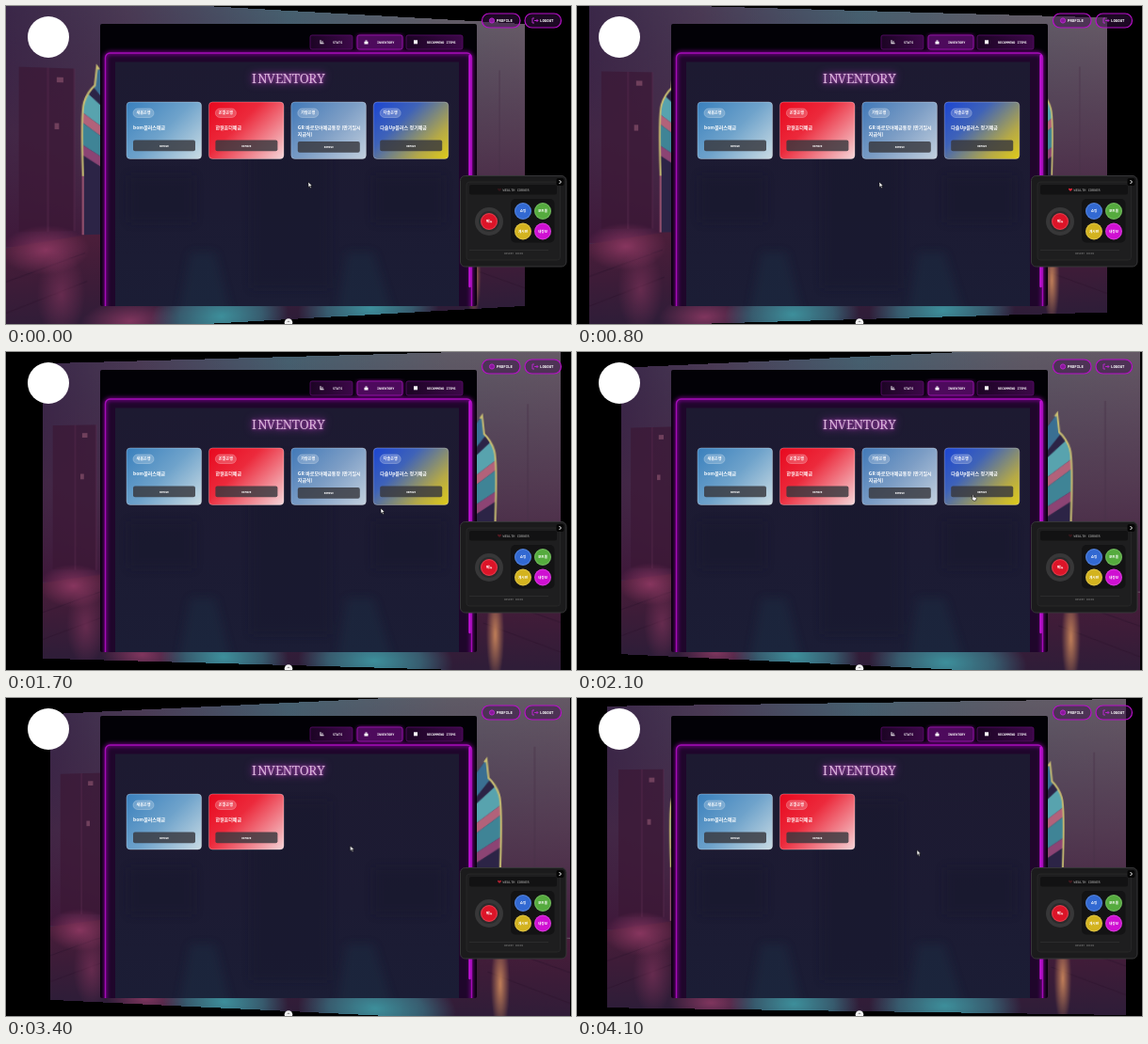
Write an HTML page that moves like this. It is 600x338 px and loops after 4.2 s.

```html
<!DOCTYPE html>
<html lang="ko">
<head>
<meta charset="utf-8">
<title>Inventory</title>
<style>
  html, body { margin: 0; width: 100%; height: 100%; overflow: hidden; background: #000; }
  .stage { position: relative; width: 600px; height: 338px; overflow: hidden; background: #000; perspective: 312px; perspective-origin: 301px 169px; }
  .room { position: absolute; left: 26px; top: 5px; width: 550px; height: 328px; animation: sway 4.2s infinite; }
  .ui { position: absolute; left: 0; top: 0; }
  text { font-family: "DejaVu Sans Mono", monospace; font-weight: bold; fill: #fff; }
  .ko { font-family: "Noto Sans CJK KR", "Noto Sans CJK", sans-serif; font-weight: 700; }
  .mid { text-anchor: middle; }
  .title { font: 13.5px "Noto Serif", serif; fill: #d9b4da; filter: drop-shadow(0 0 1.5px #b048b8) drop-shadow(0 0 4px #8a2c98); }

  .face { animation: shrink 4.2s step-end infinite; }
  .card3 { animation: drop3 4.2s step-end infinite; }
  .card4 { animation: drop4 4.2s step-end infinite; }
  .deep { animation: deepen 4.2s step-end infinite; }
  .heart { animation: pulse 4.2s ease-in-out infinite; }
  .cursor { animation: move 4.2s linear infinite; }
  .arrow { animation: arrow 4.2s step-end infinite; }
  .hand { animation: hand 4.2s step-end infinite; }

  @keyframes sway {
    0% { transform: rotateY(6.13deg); animation-timing-function: cubic-bezier(.393, .12, .574, 1); }
    65.7% { transform: rotateY(-6.3deg); animation-timing-function: cubic-bezier(.418, 0, .711, .494); }
    100% { transform: rotateY(-.9deg); }
  }
  @keyframes shrink { 0% { height: 60.5px; } 73.8%, 100% { height: 59px; } }
  @keyframes drop3 { 0% { visibility: visible; } 73.8%, 100% { visibility: hidden; } }
  @keyframes drop4 { 0% { visibility: visible; } 54.8%, 100% { visibility: hidden; } }
  @keyframes deepen { 0% { opacity: 0; } 54.8%, 100% { opacity: 1; } }
  @keyframes pulse { 0%, 47.6%, 95.2% { opacity: .15; } 23.8%, 71.4% { opacity: 1; } 100% { opacity: .3; } }
  @keyframes move {
    0%, 26.2% { transform: translate(321px, 187px); }
    31% { transform: translate(333px, 190px); }
    40.5% { transform: translate(398px, 166px); }
    47.6%, 56% { transform: translate(420px, 151px); }
    64.3% { transform: translate(383px, 150.5px); }
    67.9%, 73% { transform: translate(366px, 151px); }
    81% { transform: translate(365.5px, 157px); }
    97.6%, 100% { transform: translate(361px, 161.5px); }
  }
  @keyframes arrow { 0%, 54.8%, 73.8%, 100% { opacity: 1; } 44%, 66.7% { opacity: 0; } }
  @keyframes hand { 0%, 54.8%, 73.8%, 100% { opacity: 0; } 44%, 66.7% { opacity: 1; } }
</style>
</head>
<body>
<div class="stage">
  <svg class="room" viewBox="26 5 550 328" width="550" height="328">
    <defs>
      <linearGradient id="wall"><stop stop-color="#3a2748"/><stop offset=".2" stop-color="#4a3a54"/><stop offset=".5" stop-color="#46606f"/><stop offset=".8" stop-color="#5f5b66"/><stop offset="1" stop-color="#665a66"/></linearGradient>
      <linearGradient id="dusk" x2="0" y2="1"><stop stop-color="#3a1f42" stop-opacity="0"/><stop offset=".55" stop-color="#472644" stop-opacity=".6"/><stop offset="1" stop-color="#3f1638" stop-opacity=".9"/></linearGradient>
      <linearGradient id="floor" x2="0" y2="1"><stop stop-color="#4c1e3a"/><stop offset=".5" stop-color="#3d1c38"/><stop offset="1" stop-color="#2e1d38"/></linearGradient>
      <radialGradient id="teal"><stop stop-color="#3d8f9b"/><stop offset=".6" stop-color="#3d8f9b" stop-opacity=".55"/><stop offset="1" stop-color="#3d8f9b" stop-opacity="0"/></radialGradient>
      <radialGradient id="pink"><stop stop-color="#a2406e" stop-opacity=".7"/><stop offset="1" stop-color="#a2406e" stop-opacity="0"/></radialGradient>
      <radialGradient id="gold"><stop stop-color="#d08a5c" stop-opacity=".9"/><stop offset="1" stop-color="#d08a5c" stop-opacity="0"/></radialGradient>
      <clipPath id="side"><path id="edge" d="M470 112 L499 71 L501 90 Q508 97 511 107 T512 180 V238 H470Z"/></clipPath>
      <g id="cabinet">
        <g clip-path="url(#side)">
          <path d="M470 60h50v180h-50z" fill="#2c2446"/>
          <path d="M470 112L502 66V92L470 134z" fill="#3a6f92"/>
          <path d="M470 134L514 92V116L470 150z" fill="#58a3ae"/>
          <path d="M470 150L514 116V126L470 160z" fill="#b2627a"/>
          <path d="M470 160L514 126V148L470 178z" fill="#3f8496"/>
          <path d="M470 178L514 148V158L470 188z" fill="#8c4474"/>
        </g>
        <path d="M497 74L499 71L501 90Q508 97 511 107T512 180" fill="none" stroke="#c8bd72" stroke-width="1.8"/>
        <path d="M512 180V238" stroke="#b2607c" stroke-width="1.4"/>
      </g>
    </defs>
    <path d="M26 5h550v328H26z" fill="url(#wall)"/>
    <path d="M26 5h550v243H26z" fill="url(#dusk)"/>
    <path d="M38 74h50v160H38z" fill="#3b1736" opacity=".7"/>
    <path d="M64 74v160M88 74v160" stroke="#5a2c50" stroke-width=".8"/>
    <path d="M72 83h6v5h-6zM70 128h4v6h-4z" fill="#70405c"/>
    <path d="M544 60v180" stroke="#4b3349" stroke-width=".8"/>
    <path d="M26 249L100 238H500L576 249V333H26z" fill="url(#floor)"/>
    <path d="M26 282L98 256M26 312L100 284M576 282L502 256M576 312L500 284" stroke="#2e152e" stroke-width=".7"/>
    <ellipse cx="62" cy="252" rx="40" ry="24" fill="url(#pink)"/>
    <ellipse cx="76" cy="296" rx="22" ry="44" fill="url(#pink)" opacity=".6"/>
    <ellipse cx="140" cy="326" rx="46" ry="22" fill="url(#pink)"/>
    <ellipse cx="230" cy="326" rx="70" ry="40" fill="url(#teal)"/>
    <ellipse cx="390" cy="326" rx="80" ry="40" fill="url(#teal)"/>
    <ellipse cx="512" cy="296" rx="9" ry="48" fill="url(#gold)"/>
    <use href="#cabinet"/>
    <use href="#cabinet" transform="matrix(-1 0 0 1 608 0)"/>
  </svg>

  <svg class="ui" width="600" height="338" viewBox="0 0 600 338">
    <defs>
      <g id="slant"></g>
      <linearGradient id="axis" gradientUnits="userSpaceOnUse" x1="5" y1="-5" x2="75" y2="65"/>
      <linearGradient id="c1" href="#axis"><stop stop-color="#3980bd"/><stop offset=".5" stop-color="#6fa3cb"/><stop offset="1" stop-color="#cbdce4"/></linearGradient>
      <linearGradient id="c2" href="#axis"><stop stop-color="#e8081e"/><stop offset=".4" stop-color="#ec2a3c"/><stop offset="1" stop-color="#f5d6d9"/></linearGradient>
      <linearGradient id="c3" href="#axis"><stop stop-color="#4179b8"/><stop offset=".5" stop-color="#7c9dc5"/><stop offset="1" stop-color="#c3d0de"/></linearGradient>
      <linearGradient id="c4" href="#axis"><stop stop-color="#1c46d2"/><stop offset=".35" stop-color="#3f63b8"/><stop offset=".75" stop-color="#b5a947"/><stop offset="1" stop-color="#e0cc18"/></linearGradient>
      <linearGradient id="deep" x2=".5" y2=".5"><stop stop-color="#1238c8"/><stop offset="1" stop-color="#1238c8" stop-opacity="0"/></linearGradient>
      <linearGradient id="tab"><stop stop-color="#1c0424"/><stop offset="1" stop-color="#3c0848"/></linearGradient>
      <linearGradient id="body" x2="0" y2="1"><stop stop-color="#1d1a31"/><stop offset=".6" stop-color="#1c1b33"/><stop offset="1" stop-color="#1b1d35"/></linearGradient>
      <clipPath id="box"><path d="M100 19h400v300H100z"/></clipPath>
      <filter id="blur" x="-20%" y="-20%" width="140%" height="140%"><feGaussianBlur stdDeviation="2"/></filter>
      <filter id="soft" x="-20%" y="-20%" width="140%" height="140%"><feGaussianBlur stdDeviation="5"/></filter>
    </defs>

    <g clip-path="url(#box)">
      <rect x="100" y="19" width="400" height="300" rx="2" fill="#020106"/>
      <rect x="105.500" y="50" width="389" height="300" rx="5" fill="#1f062b"/>
      <rect x="105.500" y="50" width="389" height="300" rx="5" fill="none" stroke="#86089a" stroke-width="3" filter="url(#blur)"/>
      <rect x="105.500" y="50" width="389" height="300" rx="5" fill="none" stroke="#a50cb8" stroke-width="1.400"/>
      <path d="M116 59.500h365V319H116z" fill="url(#body)"/>
      <g filter="url(#soft)" opacity=".35">
        <path d="M260 110h84v190h-84zM130 180h70v50h-70zM390 180h75v50h-75z" fill="#14132a"/>
        <path d="M196 262h26l16 64h-54zM362 262h28l20 64h-58z" fill="#1d3549"/>
      </g>
      <path d="M492.500 53V298" stroke="#c412da" stroke-width="2.400" stroke-linecap="round"/>
    </g>
    <text class="title mid" x="263.5 272.4 281.300 290.200 299 307.800 316.700 325.600 334.500" y="82">INVENTORY</text>

    <g id="tabs"></g>
    <g id="cards"></g>

    <circle cx="45" cy="33" r="22" fill="#fff"/>

    <g fill="#3a1048" fill-opacity=".5" stroke="#b80fc9" stroke-width="1.200">
      <rect x="505.500" y="8" width="40.500" height="15" rx="7.500"/>
      <rect x="551" y="8" width="38.500" height="15" rx="7.500"/>
    </g>
    <g fill="none" stroke="#b428c8">
      <circle cx="516" cy="15.500" r="2.600" fill="#8a189c"/>
      <path d="M561 13h-2v5h2M561 15.500h4M563.500 14l1.500 1.500l-1.500 1.500"/>
    </g>
    <text x="521" y="17" font-size="4">PROFILE</text>
    <text x="567" y="17" font-size="4">LOGOUT</text>

    <rect x="482.500" y="180.500" width="112.500" height="96.500" rx="5" fill="#1b1b1c" stroke="#363638"/>
    <rect x="489" y="187" width="99.500" height="83" rx="3" fill="#1e1e1f" stroke="#2c2c2d" stroke-width=".7"/>
    <rect x="492" y="190" width="93" height="10.500" rx="2" fill="#121213"/>
    <text x="527.500" y="196.600" font-size="3.600" style="fill:#858585">WEALTH CORNER</text>
    <path class="heart" d="M524 197l-2-2q0-1.500 1-1.200l1 .7l1-.7q1-.3 1 1.200z" fill="#f0283c"/>
    <path d="M492 259.500h84" stroke="#333" stroke-width=".7"/>
    <text class="mid" x="539" y="264" font-size="2.800" style="fill:#686868">INSERT COINS</text>
    <circle cx="513" cy="229" r="15" fill="#373738"/>
    <circle cx="513" cy="229" r="11" fill="#2b2b2c"/>
    <rect x="536" y="205" width="46.500" height="46.500" rx="5" fill="#131314"/>
    <g id="pads"></g>
    <rect x="584.500" y="183" width="8" height="8" rx="2" fill="#050505"/>
    <path d="M587.500 185l2 2l-2 2" fill="none" stroke="#fff"/>

    <circle cx="300" cy="336.500" r="4.300" fill="#f4f4f4"/>
    <path d="M298.800 336l1.200-1.200l1.200 1.200" fill="none" stroke="#555" stroke-width=".7"/>

    <g class="cursor" stroke="#111" stroke-width=".6" fill="#fff">
      <path class="arrow" d="M0 0v5.500l1.300-1.100l1 2l1-.5l-.9-1.900h1.700z"/>
      <path class="hand" d="M0 1q.7-1 1.200 0v2l2.600.6q.6.300.4 1.200l-.7 2.200h-2.700l-1.800-2.500q.3-.8 1 0z"/>
    </g>
  </svg>
</div>
<script>
  const fill = (id, list, draw) => {
    document.getElementById(id).innerHTML = list.map(draw).join('');
  };

  const bars = 'v4h4v-1h-3v-3zm2 1v1.500h1v-1.500z';
  const bag = 'm0 1.500h4v2.800h-4zm1-1.300h2v1h-2z';
  const note = 'h4v4h-4z';
  fill('tabs', [
    ['STATS', 323, 45, 333.5, 347, bars],
    ['INVENTORY', 373, 48, 380.5, 394, bag],
    ['RECOMMEND ITEMS', 425, 60, 433, 447, note],
  ], ([label, x, w, ix, tx, icon], i) => `
    ${i === 1 ? `<rect x="${x}" y="31" width="${w}" height="15" rx="2" fill="#8a0e9c" filter="url(#blur)"/>` : ''}
    <rect x="${x}" y="31" width="${w}" height="15" rx="2" fill="${i === 1 ? '#4d0a5c' : 'url(#tab)'}"
      stroke="${i === 1 ? '#a016b4' : '#5c0c6c'}" stroke-width=".8"/>
    <path d="M${ix} 36.300${icon}" fill="#fff"/>
    <text x="${tx}" y="39.800" font-size="3.400">${label}</text>`);

  fill('cards', [
    ['새봄은행', ['bom플러스예금']],
    ['온별은행', ['한걸음더예금']],
    ['가람은행', ['GR 바로모아예금통장 (만기일시', '지급식)']],
    ['다솔은행', ['다솔Up플러스 정기예금']],
  ], ([bank, lines], i) => {
    const by = lines.length > 1 ? 42 : 40.5;
    const face = 'class="face" width="79.600" height="60.500" rx="4"';
    return `<g class="card${i + 1}" transform="translate(${128 + i * 87.4} 102)">
      <rect ${face} fill="url(#c${i + 1})" stroke="#fff" stroke-opacity=".35" stroke-width=".8"/>
      ${i === 2 ? `<g class="deep"><rect ${face} fill="url(#deep)"/></g>` : ''}
      <rect x="7" y="7" width="22" height="9.500" rx="4.700" fill="#fff" fill-opacity=".22" stroke="#fff" stroke-opacity=".4" stroke-width=".6"/>
      <text class="ko mid" x="18" y="13.300" font-size="4.100">${bank}</text>
      ${lines.map((s, n) => `<text class="ko" x="7" y="${29 + n * 6.5}" font-size="5">${s}</text>`).join('')}
      <rect x="7" y="${by}" width="66" height="11.700" rx="2" fill="#37383d" fill-opacity=".82"/>
      <text class="mid" x="40" y="${by + 7}" font-size="2.800">REMOVE</text>
    </g>`;
  });

  fill('pads', [
    [513, 229, '#dc1428', '메뉴'],
    [549, 218, '#3269d2', '쇼핑'],
    [570, 218, '#55ab3e', '포트폴'],
    [549, 239.5, '#d3b31f', '게시판'],
    [570, 239.5, '#cf10d2', '내정보'],
  ], ([x, y, color, label]) => `
    <circle cx="${x}" cy="${y}" r="9" fill="${color}"/>
    <circle cx="${x}" cy="${y}" r="8.400" fill="none" stroke="#fff" stroke-opacity=".18"/>
    <text class="ko mid" x="${x}" y="${y + 1.3}" font-size="3.600">${label}</text>`);
</script>
</body>
</html>
```
